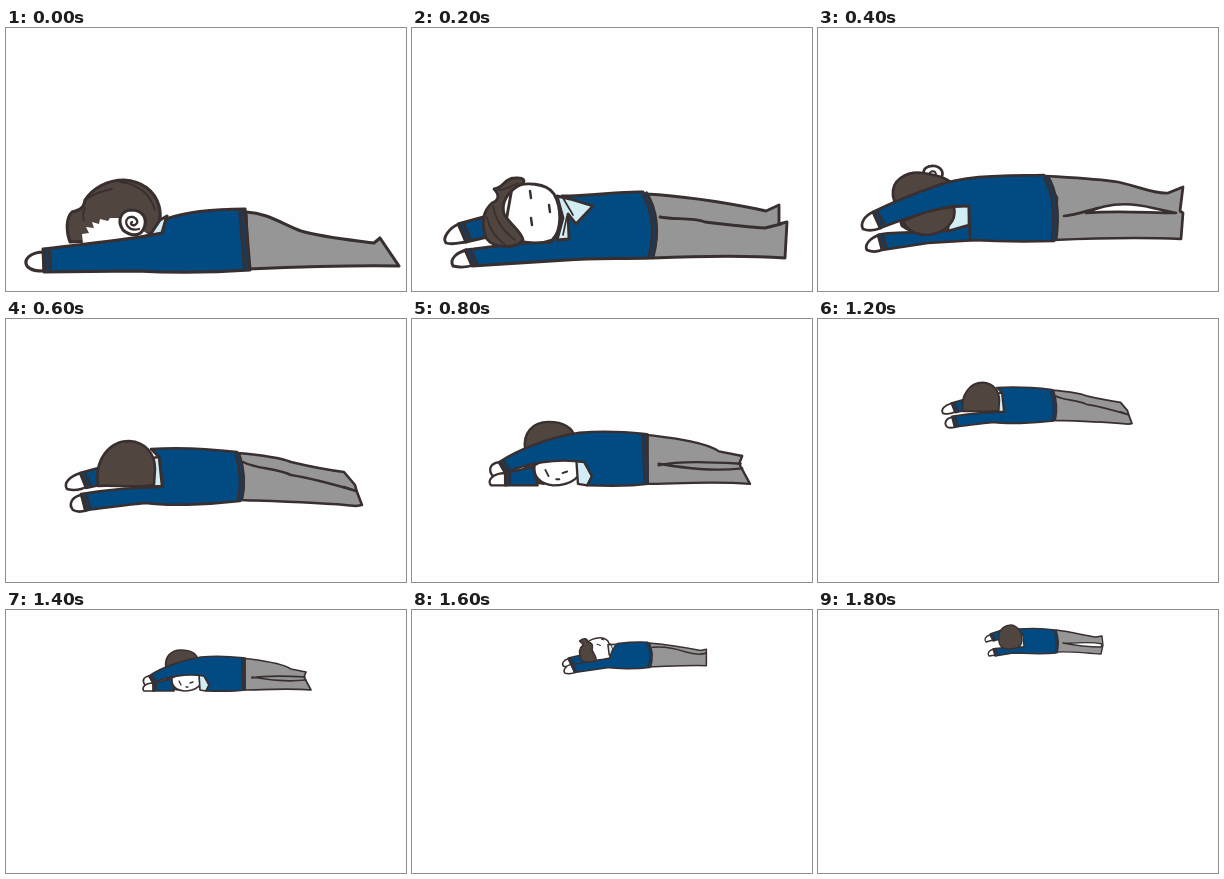
These frames come from a looping animation (400x263 px, 1900 ms). An HTML page with a canvas:

```html
<!DOCTYPE html>
<html lang="en">
<head>
<meta charset="utf-8">
<title>Rolling away</title>
<style>
html, body { margin: 0; width: 100%; height: 100%; overflow: hidden; background: #fefefe; }
canvas { display: block; }
</style>
</head>
<body>
<canvas id="stage" width="400" height="263"></canvas>
<script>
const ctx = document.getElementById('stage').getContext('2d');
const INK = '#392f2f', PAPER = '#fefefe';
const STEP = 100, STEPS = 19;
let weight = 3;

function line(d, factor = 1, color = INK, cap = 'round') {
  ctx.strokeStyle = color;
  ctx.lineWidth = weight * factor;
  ctx.lineCap = cap;
  ctx.stroke(new Path2D(d));
}
function shape(fill, d, outlined = true) {
  ctx.fillStyle = fill;
  ctx.fill(new Path2D(d));
  if (outlined) line(d);
}
const skin = d => shape(PAPER, d);
const hair = d => shape('#51453f', d);
const knit = d => shape('#024a82', d);
const trousers = d => shape('#969696', d);
const shirt = d => shape('#d3edf5', d);
const gap = d => shape(PAPER, d);
function hem(d) {
  line(d, 2.5, INK, 'butt');
  line(d, 0.8, '#173c61', 'butt');
}

// Poses of the roll, keyed by the step whose box they are drawn in.
const poses = {
  0() {
    skin('M38 224C25 224 17 231 21 238C25 243 32 243 38 243Z');
    hair('M64 214C60 203 60 190 66 184C74 182 78 180 79 172C87 160 101 152 118 152C136 153 149 163 153 178C156 189 154 197 147 205L110 212Z');
    line('M79 172C90 164 100 162 106 161M114 154C132 156 144 166 149 182M79 180C77 185 76 188 78 192', .6);
    shape(PAPER, 'M77 216L76 206L83 205L80 199L88 200L86 194L93 196L94 191L102 193L104 190L116 190L142 206L110 214Z', false);
    skin('M117 202C111 193 114 183 125 182C137 182 143 191 137 202C133 209 124 208 117 202');
    line('M133 201C123 204 117 195 122 190C128 186 135 194 129 197C125 198 124 195 126 194', .75);
    shirt('M144 207L154 192L161 188L157 206Z');
    trousers('M240 184C262 185 276 196 295 203C315 209 345 212 368 215L374 210L393 238C350 237 290 239 242 241Z');
    knit('M37 221C70 217 110 213 140 208L156 205L160 191C185 182 215 181 239 181L244 242C200 245 170 245 130 243L38 244Z');
    hem('M41 221L42 244M236 182L241 242');
  },
  2() {
    skin('M47 196C37 200 30 210 34 215C40 217 47 215 54 214Z');
    knit('M46 196L86 185L88 206L54 214Z');
    hem('M49 195L57 213');
    skin('M55 222C45 224 37 231 41 238C49 240 56 239 62 237Z');
    trousers('M234 166C270 168 310 174 345 181L354 183L367 177L367 196L375 194L373 230C330 227 290 228 241 230Z');
    line('M248 189C262 192 280 189 293 194C310 196 336 199 353 200L369 196');
    knit('M150 168C180 168 210 163 231 164L240 180C246 195 245 215 240 230C205 231 180 230 155 232L60 238L53 222C85 218 110 214 140 214Z');
    hem('M56 221L63 237M232 165C243 182 245 205 239 229');
    skin('M100 160C112 153 135 155 142 166C150 180 150 203 140 212C125 218 100 214 92 205Z');
    hair('M74 210C69 195 71 183 80 175C88 172 87 166 82 161C92 160 92 150 103 150C112 149 114 153 110 156C95 163 89 175 92 186C98 197 109 202 111 212C104 221 82 221 74 210Z');
    line('M81 178C84 194 92 204 103 212M75 189C78 204 86 211 93 217M86 162C94 162 100 158 106 155', .6);
    shirt('M145 168L158 171L181 178L164 196L156 186L157 211L145 212L151 190Z');
    line('M151 170L161 187M155 188L151 207', .6);
    line('M118 163L119 170M137 177L138 184M119 190L120 197', .85);
  },
  4() {
    skin('M106 148C104 141 109 137 117 138C125 140 127 147 121 152Z');
    line('M111 147C112 142 118 142 118 147', .7);
    skin('M55 184C46 188 42 196 45 201C52 204 58 202 63 200Z');
    skin('M61 207C52 210 46 217 49 222C56 225 62 223 66 221Z');
    trousers('M228 148C260 150 280 151 300 154C320 158 335 166 350 165L365 159L362 183L365 185L363 211C320 209 280 210 236 212Z');
    gap('M268 185C290 174 315 175 335 180L358 185C330 185 300 182 268 185Z');
    line('M246 188C258 187 268 183 280 180');
    hair('M75 168C73 152 88 143 105 145C120 147 130 150 140 160L140 190C130 206 100 210 84 198Z');
    knit('M60 207C76 203 105 205 130 203L152 196L160 212L110 215L64 222Z');
    shirt('M131 179L151 178L151 197L130 203Z');
    knit('M55 184C75 174 95 166 118 158C150 146 190 148 226 147L239 170L236 213C205 214 170 213 152 212L151 178L135 178C105 184 80 193 62 200Z');
    hair('M85 193C103 185 122 180 136 179C139 193 128 206 107 207C96 206 88 201 85 193Z');
    hem('M57 183L65 199M62 206L67 221M228 149C238 166 239 190 236 212');
  },
  6() {
    skin('M75 154C64 157 57 164 61 170C68 172 75 171 82 167Z');
    knit('M74 154L96 148L98 165L80 169Z');
    hem('M77 153L83 168');
    skin('M75 176C66 178 62 185 67 191C72 194 80 192 85 190Z');
    trousers('M231 134C255 136 275 139 285 143C310 149 330 152 338 153L349 166L351 173L356 186L350 187C310 183 260 182 233 181Z');
    line('M237 143C250 150 270 149 285 156C310 160 330 166 350 172L338 168');
    knit('M145 130C175 128 205 130 231 133L237 155L234 182C200 186 160 187 140 184C115 186 95 190 79 191L75 175C100 171 130 168 157 168L153 138Z');
    shirt('M146 139L153 138L156 167L138 168Z');
    hair('M92 167C88 140 104 122 123 122C140 123 149 135 149 150L148 166C130 169 110 166 92 167Z');
    hem('M78 175L83 191M231 134C237 152 237 168 234 181');
  },
  10() {
    skin('M100 118C92 120 89 127 93 130C99 132 103 130 105 129Z');
    knit('M100 117L121 112L130 124L106 130Z');
    skin('M104 127C95 130 91 137 95 141C102 143 107 141 111 140Z');
    trousers('M227 93C255 95 290 101 310 105L319 103L319 129C290 128 260 130 230 131Z');
    line('M234 100C255 98 270 102 285 107C298 111 308 113 319 109');
    skin('M130 92C140 84 155 82 163 90C168 98 168 110 166 118L140 122Z');
    shirt('M163 96L176 95L170 112L165 112Z');
    line('M167 94L171 104', .6);
    knit('M178 94C195 92 210 91 226 92L233 110L229 132C205 135 175 134 165 132L110 140L106 128C125 122 150 121 166 117C168 108 172 100 178 94Z');
    hair('M121 120C116 108 118 100 124 96L118 90C124 84 132 86 130 91C138 92 140 96 138 104C140 110 146 116 144 121C136 125 126 124 121 120Z');
    line('M146 95L151 97M153 87L156 88', .8);
    hem('M102 117L108 128M107 128L112 140M227 93C233 107 232 120 229 131');
  },
  14() {
    skin('M143 66C137 67 136 71 139 75L147 73Z');
    skin('M147 73C139 73 135 78 138 81L148 81Z');
    hair('M160 58C158 47 165 40 175 40C185 40 191 44 192 50L190 64L172 80L160 78Z');
    knit('M147 73L165 69L168 81L147 81Z');
    trousers('M236 48C250 50 275 52 285 59L300 62L298 67L305 80C280 78 255 80 238 80Z');
    line('M246 68C260 65 280 66 299 67M246 67C265 70 280 72 300 70');
    skin('M166 68C175 62 190 62 198 66C197 75 190 81 178 81C170 80 165 76 166 68Z');
    shirt('M193 65L199 66L203 75L200 81L194 80Z');
    knit('M143 66C155 58 175 50 195 47C215 45 230 47 239 48L239 80C225 82 210 81 200 81L203 75L198 66C180 63 160 67 147 73Z');
    line('M173 71L175 75M184 73L187 72M180 77L182 77', .8);
    hem('M145 65L149 72M149 73L149 81M237 48L238 80');
  },
  18() {
    skin('M172 25C167 26 166 30 168 32L175 30Z');
    knit('M172 24L184 20L186 28L175 31Z');
    skin('M176 39C171 40 169 43 171 46L178 45Z');
    trousers('M238 20C255 22 268 26 278 27L284 26L285 35L283 44C265 43 252 41 239 42Z');
    gap('M245 33C258 34 270 31 284 34L283 37C270 37 260 36 245 33Z');
    knit('M200 19C212 18 225 18 237 20L240 32L238 43C220 45 205 43 195 43L177 46L175 39C185 37 195 37 205 37L205 25Z');
    shirt('M202 25L205 25L206 37L199 37Z');
    hair('M181 27C181 18 188 15 193 15C200 16 204 22 204 30C204 37 198 39 190 39C183 39 180 34 181 27Z');
    hem('M173 24L177 30M177 38L179 46M237 20C240 29 240 36 238 43');
  }
};

// Pose used at each step of the loop.
const order = [0, 14, 2, 10, 4, 6, 6, 0, 14, 2, 10, 4, 6, 0, 14, 2, 10, 4, 18];

// Where the body lies: step, left, right, bottom.
const track = [
  [0, 18, 394, 245], [2, 31, 375, 238], [4, 43, 365, 222], [6, 58, 356, 193],
  [10, 91, 320, 143], [12, 123, 314, 109], [14, 135, 305, 82], [18, 166, 285, 47]
];

function boxAt(step) {
  const i = Math.max(1, track.findIndex(key => key[0] >= step));
  const a = track[i - 1], b = track[i];
  const k = (step - a[0]) / (b[0] - a[0]);
  const [, left, right, bottom] = a.map((v, n) => v + (b[n] - v) * k);
  return { left, bottom, width: right - left };
}

function draw(step) {
  const pose = order[step];
  const home = boxAt(pose), box = boxAt(step);
  const scale = box.width / home.width;
  ctx.setTransform(1, 0, 0, 1, 0, 0);
  ctx.fillStyle = PAPER;
  ctx.fillRect(0, 0, 400, 263);
  ctx.translate(box.left, box.bottom);
  ctx.scale(scale, scale);
  ctx.translate(-home.left, -home.bottom);
  ctx.lineJoin = 'round';
  weight = (0.5 + box.width / 145) / scale;
  poses[pose]();
}

const start = performance.now();
function tick() {
  draw(Math.floor((performance.now() - start) / STEP) % STEPS);
  requestAnimationFrame(tick);
}
tick();
</script>
</body>
</html>
```
